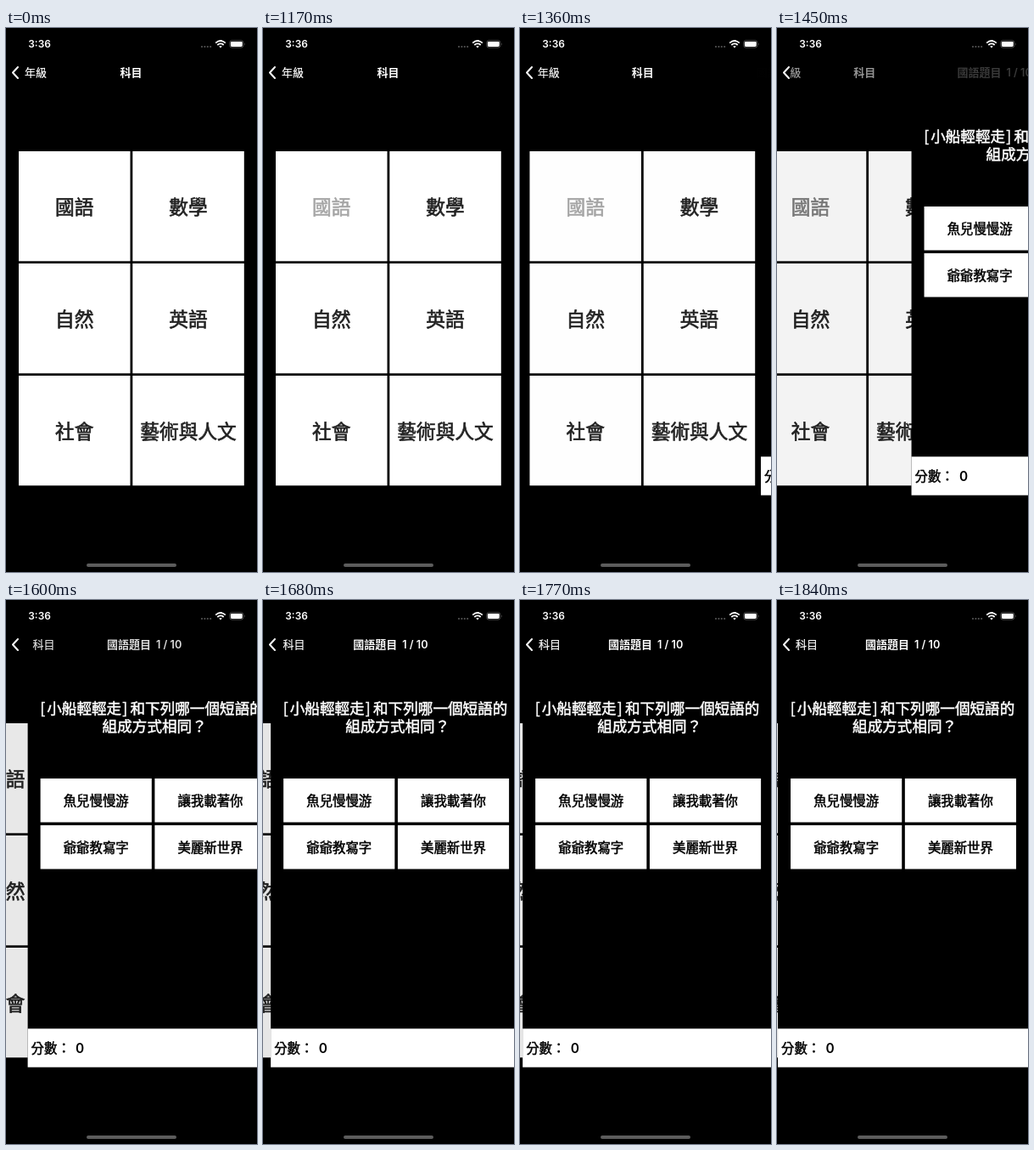
Animation, 296 px wide and 640 px high, one loop 4.15 s. Source, as an HTML page:

```html
<!DOCTYPE html>
<html lang="zh-Hant">
<head>
<meta charset="utf-8">
<title>科目</title>
<style>
  html, body { margin: 0; width: 100%; height: 100%; overflow: hidden; background: #000; }
  svg { display: block; width: 296px; height: 640px; }
  text { font-family: "Noto Sans CJK TC", "Noto Sans CJK", sans-serif; font-weight: 500; white-space: pre; }
  .num { font-family: Inter, sans-serif; font-weight: 600; }
  .mid { text-anchor: middle; }
  .bar { font-size: 13px; fill: #fff; }
  .bold { font-weight: 700; }
  .plain { font-weight: 400; stroke: #fff; stroke-width: .2px; }
  .cell { font-size: 22.7px; fill: #222; stroke: #222; stroke-width: .65px; }
  .answer { font-size: 15.4px; fill: #000; stroke: #000; stroke-width: .5px; }
  .question { font-size: 17.6px; fill: #fff; stroke: #fff; stroke-width: .5px; }
  .score { font-size: 15.4px; fill: #000; }
</style>
</head>
<body>
<svg viewBox="0 0 296 640">
  <defs>
    <clipPath id="labelClip"><rect x="15" y="40" width="281" height="26"/></clipPath>
  </defs>
  <rect width="296" height="640"/>
  <g id="menu"></g>
  <rect id="dim" width="296" height="640" opacity="0"/>

  <g id="quiz">
    <rect width="296" height="640"/>
    <g class="question">
      <text x="14.6" y="134">[</text>
      <text x="22.6" y="134">小船輕輕走</text>
      <text x="111.7" y="134">]</text>
      <text x="120.9" y="134">和下列哪一個短語的</text>
      <text x="88" y="155">組成方式相同？</text>
    </g>
    <g id="answers"></g>
    <rect y="504.3" width="296" height="45.4" fill="#fff"/>
    <text class="answer" x="4" y="533">分數：</text>
    <text class="score num" x="56.5" y="532.5">0</text>
  </g>

  <g clip-path="url(#labelClip)">
    <text id="oldBack" class="bar plain" x="22" y="57">年級</text>
    <text id="newBack" class="bar plain mid" y="57">科目</text>
  </g>
  <text id="oldTitle" class="bar bold mid" y="57">科目</text>
  <g id="newTitle">
    <text class="bar bold" x="104" y="57">國語題目</text>
    <text class="bar num" x="162" y="57" style="font-size:12.7px">1 / 10</text>
  </g>
  <path d="M14 46L8 52.5L14 59" fill="none" stroke="#fff" stroke-width="2" stroke-linecap="round" stroke-linejoin="round"/>

  <text class="num" x="26.3" y="23" font-size="11.9" fill="#fff">3:36</text>
  <g fill="#555">
    <circle cx="231" cy="22" r="1.1"/><circle cx="234.4" cy="22" r="1.1"/>
    <circle cx="237.8" cy="22" r="1.1"/><circle cx="241.2" cy="22" r="1.1"/>
  </g>
  <g fill="none" stroke="#fff" stroke-width="1.8">
    <path d="M247.2 17.6Q253 12.4 258.8 17.6"/>
    <path d="M249.3 20Q253 16.8 256.7 20"/>
  </g>
  <path d="M251.2 21.6Q253 20.2 254.8 21.6L253 23.4Z" fill="#fff"/>
  <rect x="263.8" y="14.8" width="16" height="8.2" rx="2.4" fill="none" stroke="#666" stroke-width=".8"/>
  <rect x="264.9" y="15.9" width="13.8" height="6" rx="1.4" fill="#fff"/>
  <path d="M281 17.4q1.3 1.5 0 3z" fill="#666"/>
  <rect x="95" y="630" width="106" height="4" rx="2" fill="#5c5c5c"/>
</svg>
<script>
const $ = id => document.getElementById(id);
const LOOP = 4150, WIDTH = 296, PRESS = 1170;
const ticks = [1360, 1450, 1520, 1600, 1680, 1770, 1840];

// Two-column grid of white tiles with centred labels
function grid(id, labels, cls, { x, y, gap, w, h, rowStep, drop }) {
  $(id).innerHTML = labels.map((label, i) => {
    const left = x + (i % 2) * gap, top = y + (i >> 1) * rowStep;
    return `<rect x="${left}" y="${top}" width="${w}" height="${h}" fill="#fff"/>` +
      `<text class="${cls} mid" x="${left + w / 2}" y="${top + drop}">${label}</text>`;
  }).join('');
}
grid('menu', ['國語', '數學', '自然', '英語', '社會', '藝術與人文'], 'cell',
  { x: 15, y: 145, gap: 134.3, w: 131.5, h: 129.3, rowStep: 132, drop: 73.5 });
grid('answers', ['魚兒慢慢游', '讓我載著你', '爺爺教寫字', '美麗新世界'], 'answer',
  { x: 15, y: 210, gap: 134.8, w: 131.2, h: 51.5, rowStep: 55, drop: 31.7 });
const pressed = $('menu').querySelector('text');

// Cubic bezier (.25, .1, .25, 1)
function ease(u) {
  if (u <= 0) return 0;
  if (u >= 1) return 1;
  const curve = (s, a, b) => 3 * a * s * (1 - s) ** 2 + 3 * b * s * s * (1 - s) + s ** 3;
  let lo = 0, hi = 1;
  for (let i = 0; i < 24; i++) {
    const s = (lo + hi) / 2;
    if (curve(s, .25, .25) < u) lo = s; else hi = s;
  }
  return curve(lo, .1, 1);
}

function place(id, x, opacity) {
  $(id).setAttribute('transform', `translate(${x} 0)`);
  $(id).setAttribute('opacity', opacity);
}

function draw(t) {
  const step = ticks.filter(tick => tick <= t).length - 1;
  const moving = step >= 0;

  // Pages follow a critically damped spring
  const s = .315 + 1.252 * step;
  const x = moving ? WIDTH * (1 + s) * Math.exp(-s) : WIDTH;
  const done = 1 - x / WIDTH;
  place('quiz', x, 1);
  place('menu', -.3 * (WIDTH - x), 1);
  $('dim').setAttribute('opacity', .1 * done);
  pressed.setAttribute('opacity', t < PRESS ? 1 : Math.min(1, .4 + .19 * Math.max(0, step)));

  // Navigation bar labels slide and cross-fade
  const q = moving ? ease(.04 + .2035 * step) : 0;
  const fadeIn = q ** 1.6, fadeOut = (1 - q) ** 1.5;
  const label = 147.5 - 112.5 * q;
  place('oldBack', -50 * q, 1 - q);
  place('newBack', label, fadeIn);
  place('oldTitle', label, fadeOut);
  place('newTitle', 179 * (1 - q), fadeIn);
}

const start = performance.now();
function frame() {
  draw((performance.now() - start) % LOOP);
  requestAnimationFrame(frame);
}
draw(0);
requestAnimationFrame(frame);
</script>
</body>
</html>
```
